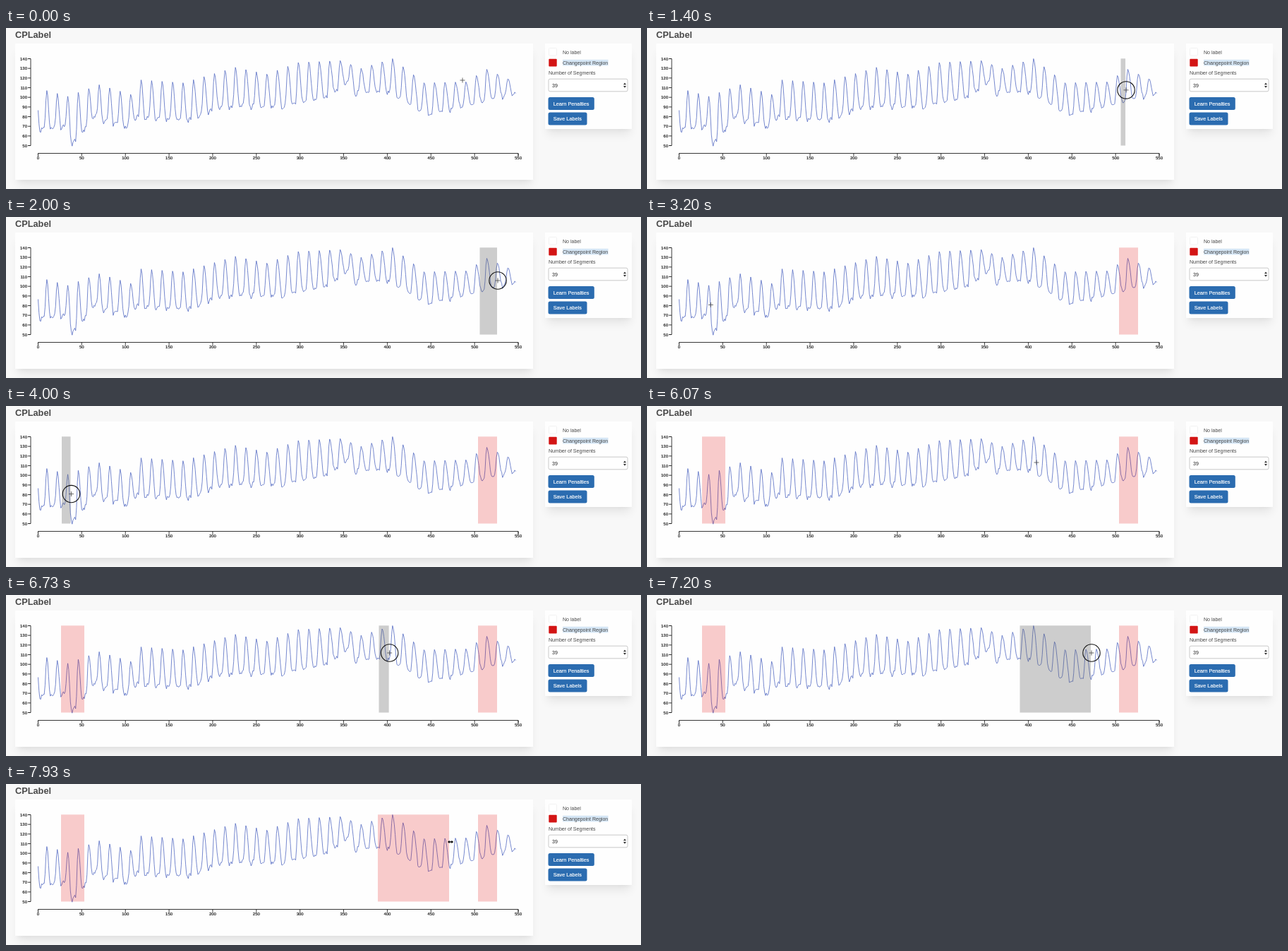
An HTML page that plays this animation: 900x228 px, repeating every 8 s.

```html
<!DOCTYPE html>
<html lang="en">
<head>
<meta charset="utf-8">
<title>CPLabel</title>
<style>
  html, body { margin: 0; width: 100%; height: 100%; overflow: hidden; background: #f8f8f8; }
  body { position: relative; font-family: "Liberation Sans", Arial, sans-serif; }
  .card {
    position: absolute; top: 22px; background: #fefefe;
    box-shadow: 0 10px 13px -2.5px rgba(0,0,0,.08), 0 5px 5px -2.5px rgba(0,0,0,.03);
  }
  #chart { left: 13px; width: 734px; height: 192.5px; }
  #panel { left: 764px; width: 122.5px; height: 121px; }
  svg { position: absolute; left: 0; top: 0; display: block; }
  text { font-size: 7.05px; fill: #484848; }
  .title { font-size: 12.75px; font-weight: bold; fill: #4a4a4a; }
  .axis text { font-size: 6px; fill: #000; stroke: #000; stroke-width: .12; }
  .axis path { stroke: #222; stroke-width: .9; fill: none; }
  .button rect { fill: #2b6cb0; }
  .button text { font-size: 7.3px; fill: #fff; stroke: #fff; stroke-width: .18; }
</style>
</head>
<body>
<div class="card" id="chart"></div>
<div class="card" id="panel"></div>
<svg width="900" height="228" viewBox="0 0 900 228">
  <text class="title" x="13" y="14.3">CPLabel</text>
  <g class="axis" id="axes"></g>
  <path id="series" fill="none" stroke="#4a62bf" stroke-width=".75" stroke-linejoin="round"/>
  <g id="regions"></g>

  <rect x="769.5" y="28.5" width="11" height="10.5" rx="1" fill="#fff" stroke="#efefef" stroke-width=".8"/>
  <text x="789" y="36.5">No label</text>
  <rect x="769.3" y="43.8" width="11.4" height="10.8" rx="1" fill="#d31414"/>
  <rect x="789" y="44.8" width="64.5" height="8.6" fill="#d5e6f5"/>
  <text x="789" y="51.7">Changepoint Region</text>
  <text x="769" y="66.3">Number of Segments</text>
  <rect x="769" y="72.2" width="112" height="17.6" rx="2" fill="#fff" stroke="#bcbcbc" stroke-width=".8"/>
  <text x="774" y="83.5" style="fill: #222">39</text>
  <path d="M875 80.3l2-2.8 2 2.8zM875 81.9l2 2.8 2-2.8z" fill="#333"/>
  <g class="button">
    <rect x="768.5" y="98" width="65.3" height="18" rx="2.5"/>
    <text x="775.7" y="109.5">Learn Penalties</text>
    <rect x="768.5" y="119.4" width="55" height="18" rx="2.5"/>
    <text x="775.7" y="130.9">Save Labels</text>
  </g>

  <g id="cursor">
    <circle id="press" r="12.2" fill="none" stroke="#111" stroke-width="1.1"/>
    <path id="cross" d="M-3.5 0H3.5M0 -3.5V3.5" stroke="#444" stroke-width=".8"/>
    <path id="resize" d="M-4 0l2.5 -2.3v1.5h3v-1.5l2.5 2.3 -2.5 2.3v-1.5h-3v1.5z" fill="#000"/>
  </g>
</svg>
<script>
const LOOP = 8000, PERIOD = 12, FIRST_PEAK = 10, SAMPLES = 548;
const $ = id => document.getElementById(id);
const mix = (a, b, p) => a + (b - a) * p;
const smooth = p => p * p * (3 - 2 * p);
const clamp = p => Math.min(1, Math.max(0, p));
const sx = v => 45.5 + v * 1.2373;
const sy = v => 43.5 + (140 - v) * 1.367;

function add(parent, tag, attrs, text = '') {
  const el = document.createElementNS('http://www.w3.org/2000/svg', tag);
  for (const key in attrs) el.setAttribute(key, attrs[key]);
  el.textContent = text;
  return parent.appendChild(el);
}

function drawAxes() {
  let d = 'M31 43.5H35V166.5H31M45.5 181.5V177.5H726V181.5';
  for (let v = 50; v <= 140; v += 10) {
    d += `M31 ${sy(v)}H35`;
    add($('axes'), 'text', { x: 30, y: sy(v) + 2.1, 'text-anchor': 'end' }, v);
  }
  for (let v = 0; v <= 550; v += 50) {
    d += `M${sx(v)} 177.5V181.5`;
    add($('axes'), 'text', { x: sx(v), y: 186.3, 'text-anchor': 'middle' }, v);
  }
  add($('axes'), 'path', { d });
}

// Straight lines between a few [cycle, value] turning points.
const envelope = keys => i => {
  const n = keys.findIndex(([at]) => at >= i);
  if (n < 1) return n ? keys.at(-1)[1] : keys[0][1];
  const [[i0, v0], [i1, v1]] = [keys[n - 1], keys[n]];
  return mix(v0, v1, (i - i0) / (i1 - i0));
};
const peak = envelope([[0, 107], [2, 101], [5, 113], [8, 103], [9, 118], [13, 115], [18, 131], [21, 124],
  [24, 136], [28, 138], [30, 130], [33, 140], [36, 115], [40, 116], [42, 129], [44, 119]]);
const low = envelope([[-1, 65], [1, 68], [2, 51], [4, 77], [7, 67], [8, 77], [13, 75], [16, 88],
  [22, 89], [26, 98], [28, 113], [29, 103], [32, 104], [36, 80], [40, 92], [44, 102]]);

function drawSeries() {
  let seed = 11;
  const noise = () => (seed = seed * 16807 % 2147483647) / 2147483647 - .5;
  const hump = p => (1 + Math.cos(Math.PI * clamp(p))) / 2;
  const value = n => {
    const i = Math.floor((n - FIRST_PEAK) / PERIOD), k = n - FIRST_PEAK - i * PERIOD;
    const fall = 4.2 + Math.min(2, Math.max(0, i) / 17);
    const rest = low(i) + 4 * clamp((k - fall) / 4);
    const down = (peak(i) - rest) * hump(k / fall);
    const up = (peak(i + 1) - rest) * hump((PERIOD - k) / 3);
    const wobble = k > 3 && k < 10 ? 4.5 : k ? 2 : 0;
    return rest + down + up + noise() * wobble;
  };
  const points = Array.from({ length: SAMPLES }, (_, n) => `${sx(n).toFixed(2)} ${sy(value(n)).toFixed(2)}`);
  $('series').setAttribute('d', 'M' + points.join('L'));
}

// The pointer rests between moves.
const home = { x: 647, y: 74 };
const moves = [
  { start: 0, end: 950, x: 671.5, y: 87 },
  { start: 1120, end: 1900, x: 697, y: 90 },
  { start: 2300, end: 3280, x: 79, y: 125 },
  { start: 3650, end: 4450, x: 112, y: 124 },
  { start: 5000, end: 6070, x: 552, y: 80 },
  { start: 6100, end: 6400, x: 528.5, y: 82 },
  { start: 6580, end: 7200, x: 630, y: 82 }
];
const drags = [
  { down: 1110, up: 2130, from: 671.5, left: 669, right: 696, leave: 2350 },
  { down: 3600, up: 4600, from: 79, left: 78, right: 111, leave: 5100 },
  { down: 6540, up: 7500, from: 528.5, left: 527, right: 628, leave: LOOP }
];

const cursorAt = t => moves.reduce((at, move) => {
  const p = smooth(clamp((t - move.start) / (move.end - move.start)));
  return { x: mix(at.x, move.x, p), y: mix(at.y, move.y, p) };
}, home);

const show = (el, on) => el.setAttribute('visibility', on ? 'visible' : 'hidden');

function render(t) {
  const { x, y } = cursorAt(t);
  let pressed = false, resizing = false;
  for (const drag of drags) {
    const held = t >= drag.down && t < drag.up;
    const left = held ? drag.from : drag.left;
    const right = held ? Math.max(left, x - 1) : drag.right;
    drag.el.setAttribute('x', left);
    drag.el.setAttribute('width', right - left);
    drag.el.setAttribute('fill', held ? 'rgba(100,100,100,.32)' : 'rgba(226,0,0,.2)');
    show(drag.el, t >= drag.down);
    pressed ||= held;
    resizing ||= t >= drag.up && t < drag.leave;
  }
  $('cursor').setAttribute('transform', `translate(${x} ${y})`);
  show($('press'), pressed);
  show($('cross'), !resizing);
  show($('resize'), resizing);
}

drawAxes();
drawSeries();
for (const drag of drags) drag.el = add($('regions'), 'rect', { y: 43.3, height: 123.2 });

const start = performance.now();
function tick(now) {
  render(Math.max(0, now - start) % LOOP);
  requestAnimationFrame(tick);
}
render(0);
requestAnimationFrame(tick);
</script>
</body>
</html>
```
